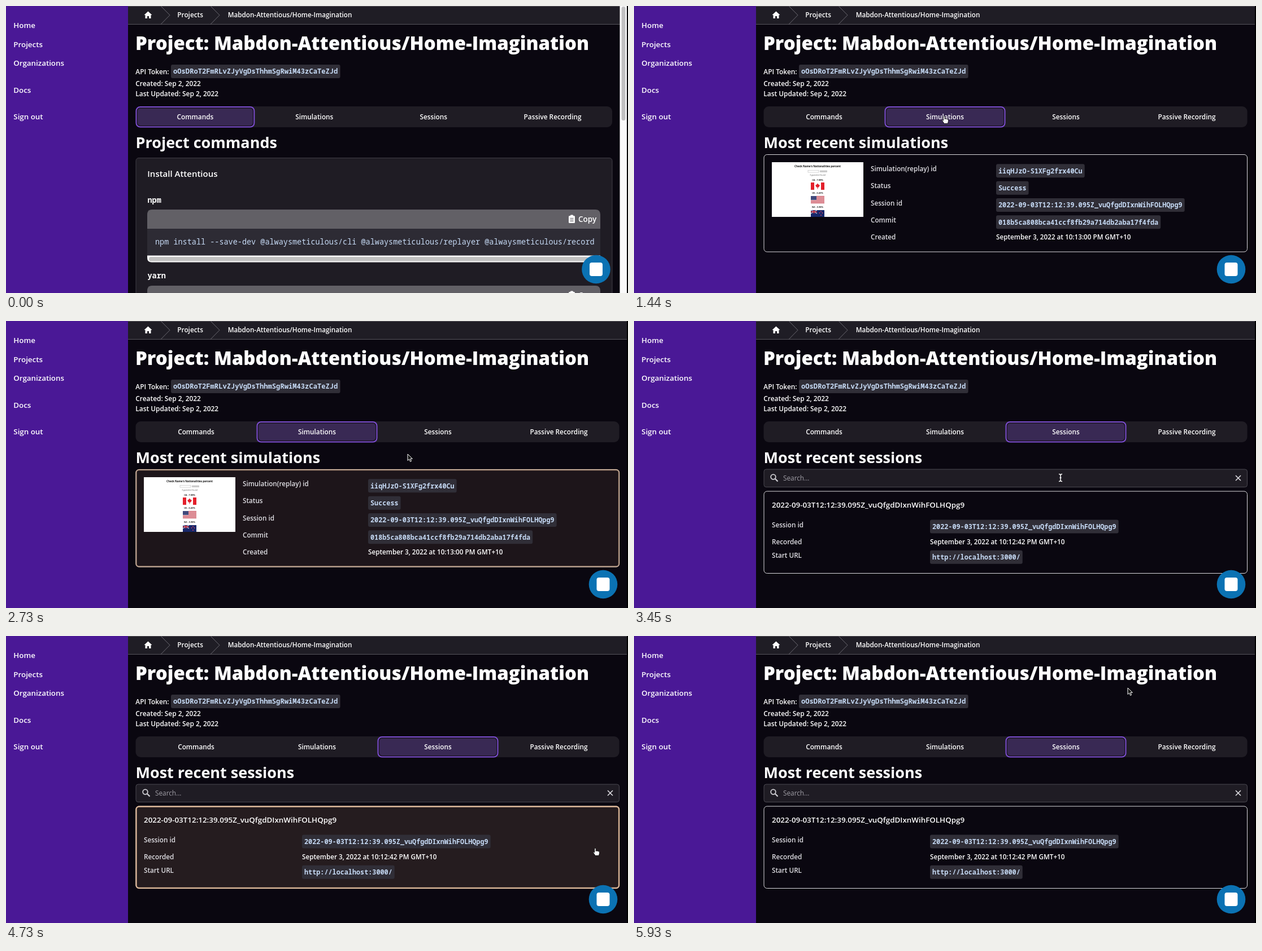
An HTML page for the animation above (6090 ms loop, 1101 by 509 pixels).

```html
<!DOCTYPE html>
<html lang="en">
<head>
<meta charset="utf-8">
<title>Project dashboard</title>
<style>
  html, body { margin: 0; width: 100%; height: 100%; overflow: hidden; background: #0a0710; }
  svg { display: block; width: 1101px; height: 509px; font-family: "Open Sans", sans-serif; }
  text { white-space: pre; }
  .mono { font-family: "Noto Sans Mono", monospace; }
</style>
</head>
<body>
<svg id="stage" viewBox="0 0 1101 509"></svg>
<script>
const LOOP = 6090, PANEL = '#1f1c24', EDGE = '#3f3d45';
const OWNER = 'Mabdon-Attentious/Home-Imagination';
const SESSION = '2022-09-03T12:12:39.095Z_vuQfgdDIxnWihFOLHQpg9';

const rect = (x, y, w, h, fill, r = 0, more = '') =>
  `<rect x="${x}" y="${y}" width="${w}" height="${h}" rx="${r}" fill="${fill}" ${more}/>`;
const path = (d, more) => `<path d="${d}" ${more}/>`;
const line = (d, color, w = 1) => path(d, `fill="none" stroke="${color}" stroke-width="${w}"`);
const text = (s, x, y, size = 11.8, weight = 600, fill = '#fff', more = '') =>
  `<text x="${x}" y="${y}" font-size="${size}" font-weight="${weight}" fill="${fill}" ${more}>${s}</text>`;
const mid = (s, x, y, size, weight, fill) => text(s, x, y, size, weight, fill, 'text-anchor="middle"');
const mono = (s, x, y, size, weight, fill) => text(s, x, y, size, weight, fill, 'class="mono"');
const code = (s, x, cy, size = 11.8) =>
  rect(x, cy - 12, s.length * size * .6 + 8, 24, '#302e37', 3) + mono(s, x + 4, cy + 4.2, size, 600, '#c6daf5');
const label = (s, x, y) => text(s, x, y, 11.7, 600, '#e0dfe4');
const heading = s => text(s, 229.5, 252, 27, 700);

function tabs(width, active) {
  const w = width / 4;
  let out = rect(229.5, 178, width, 37, PANEL, 9);
  ['Commands', 'Simulations', 'Sessions', 'Passive Recording'].forEach((name, i) => {
    const x = 229.5 + i * w;
    if (i === active)
      out += rect(x + 1, 179, w - 2, 35.5, '#1a1422', 7, 'stroke="#7c4dd0" stroke-width="2"') +
             rect(x + 3.5, 181.5, w - 7, 30.5, '#392954', 5);
    out += mid(name, x + w / 2, 200.8, 11.8, 600);
  });
  return out;
}

const chat = x => `<circle cx="${x}" cy="467" r="25.3" fill="#0b72b3"/>` + rect(x - 11.5, 455, 23, 24, '#fff', 4);

const card = (y, h) =>
  rect(230, y + .5, 855.5, h, '#0a0710', 5.5, 'stroke="#d9d8dc"') +
  rect(230.5, y + 1, 854.5, h - 1, '#2c2123', 5, 'class="hover" stroke="#f6caa3" stroke-width="2.4" opacity="0"');

const copyBar = y =>
  path(`M250 ${y + 34}v-25q0-9 9-9h784q9 0 9 9v25z`, 'fill="#626066"') +
  rect(996, y + 11, 11, 13, '#fff', 1.5) + rect(999, y + 9.5, 5, 3.5, '#fff', 1) +
  line(`M998.500 ${y + 15.5}h6m-6 2.500h6m-6 2.500h6`, '#626066') +
  text('Copy', 1013, y + 22, 13.5);

function commands() {
  return tabs(843.5, 0) + heading('Project commands') +
    rect(230, 269.5, 843, 260, PANEL, 5, `stroke="${EDGE}"`) +
    text('Install Attentious', 250.3, 303, 15, 600) +
    mono('npm', 250.5, 348.5, 13.5, 700) +
    copyBar(361) + rect(250, 395, 802, 48, '#2d2b34') +
    mono('npm install --save-dev @alwaysmeticulous/cli @alwaysmeticulous/replayer @alwaysmeticulous/record',
      264, 423, 13.5, 500, '#c6daf5') +
    path('M250 442.500h802v4q0 8-8 8h-786q-8 0-8-8z', 'fill="#fafafa"') +
    rect(253, 445, 778, 7.5, '#c1c1c1', 3.7) +
    mono('yarn', 250.5, 483, 13.5, 700) + copyBar(496) +
    rect(1086.5, 0, 12.5, 509, '#fafafa') + rect(1089.5, 1, 7, 202, '#c1c1c1', 3.5) + chat(1044.5);
}

function flags() {
  const canada = rect(313, 313, 24, 13, '#e3202b') + rect(319, 313, 12, 13, '#fff') +
    path('M325 314.500l1.500 2 2.500 1.500-2 3.500h-1.500v3h-1v-3h-1.500l-2-3.500 2.500-1.500z', 'fill="#e3202b"');
  let states = rect(313, 337, 24, 13, '#f5dfe0');
  for (let i = 0; i < 7; i++) states += rect(313, 337 + i * 2, 24, 1, '#c43b4b');
  states += rect(313, 337, 10, 7, '#414a7c');
  const zealand = rect(313, 362, 24, 12, '#17286b') +
    line('M313 362l11 6m0-6l-11 6', '#fff') + line('M313 365h11m-5.500-3v6', '#d02a3a', 1.5) +
    [[331, 364.5], [328.5, 367], [333.5, 367], [331, 371]]
      .map(([x, y]) => `<circle cx="${x}" cy="${y}" r=".9" fill="#d5415a"/>`).join('');
  return canada + states + zealand;
}

function simulations() {
  const small = (s, y) => mid(s, 325, y, 3.9, 700, '#222');
  const names = ['Simulation(replay) id', 'Status', 'Session id', 'Commit', 'Created'];
  const values = ['iiqHJzO-S1XFg2frx40Cu', 'Success', SESSION, '018b5ca808bca41ccf8fb29a714db2aba17f4fda'];
  return tabs(856, 1) + heading('Most recent simulations') + card(263, 172.5) +
    rect(244, 277, 162, 97, '#fff') +
    mid("Check Name's Nationalities percent", 325, 285.7, 4.6, 700, '#111') +
    rect(308, 291.5, 19, 3.5, '#fff', 0, 'stroke="#aaa" stroke-width=".5"') +
    rect(329, 291.5, 13, 3.5, '#ccc') +
    mid('3 guess(es) found', 325, 301, 3.4, 400, '#555') +
    small('CA - 7.88%', 309.5) + small('US - 6.43%', 333.3) + small('NZ - 5.98%', 357.8) + flags() +
    names.map((s, i) => label(s, 419, 292.8 + i * 30.35)).join('') +
    values.map((s, i) => code(s, 641, 292.3 + i * 30.35)).join('') +
    text('September 3, 2022 at 10:13:00 PM GMT+10', 641, 414.2, 11.7) + chat(1057);
}

function sessions() {
  return tabs(856, 2) + heading('Most recent sessions') +
    rect(230, 263, 855.5, 31.5, PANEL, 4, 'stroke="#4a4850"') +
    `<circle cx="246.500" cy="276.500" r="4.300" fill="none" stroke="#d0cfd4" stroke-width="1.800"/>` +
    line('M249.800 279.800l4.700 4.700', '#d0cfd4', 2.2) +
    text('Search...', 264, 283, 11.8, 500, '#a09ea6') +
    line('M1065 274l9 9m0-9l-9 9', '#e4e3e8', 1.5) +
    card(301.5, 145.5) + text(SESSION, 244, 330.7, 13.4) +
    label('Session id', 244, 365.5) + label('Recorded', 244, 396) + label('Start URL', 244, 419.5) +
    code(SESSION, 524, 364.5) +
    text('September 3, 2022 at 10:12:42 PM GMT+10', 524, 396, 11.7) +
    code('http://localhost:3000/', 524, 418.7) + chat(1057);
}

function frame() {
  const nav = [['Home', 38.8], ['Projects', 72.6], ['Organizations', 106.3], ['Docs', 153.6], ['Sign out', 200.8]];
  return rect(0, 0, 1101, 509, '#0a0710') + rect(0, 0, 216, 509, '#4a1896') +
    nav.map(([s, y]) => text(s, 13.3, y, 13.35)).join('') +
    rect(216, 0, 883, 32.5, '#1f1d25') + line('M216 .500h883M216 32.500h883', '#56545b') +
    line('M274 0l16 16.200-16 16.300M362 0l16 16.200-16 16.300', '#6a6870') +
    path('M251.500 9.500l7 6.500h-2v6h-3.500v-4h-3v4h-3.500v-6h-2z', 'fill="#fff"') +
    text('Projects', 303.3, 20.3) + text(OWNER, 392.7, 20.3, 11.7) +
    text('Project: ' + OWNER, 229, 78, 33, 800) +
    text('API Token:', 229.3, 120.6, 11.9) + code('oOsDRoT2FmRLvZJyVgDsThhmSgRwiM43zCaTeZJd', 292, 116, 12.15) +
    text('Created: Sep 2, 2022', 229.3, 142, 11.9) + text('Last Updated: Sep 2, 2022', 229.3, 160.4, 11.9);
}

const cursors = {
  arrow: path('M0 0v11.500l2.700-2.500 1.900 4.400 2-.9-1.900-4.200h3.700z', 'fill="#111" stroke="#fff"'),
  hand: path('M-1.200 1q1.200-2 2.400 0v4.500q1.200-1.200 2.200 0 1.200-.8 2 .4 1.800-.6 2 1.200v2.900l-1.200 3.500h-6l-3.800-5.500q.4-1.800 2.400 0z',
    'fill="#fff" stroke="#111" stroke-width=".9"'),
  beam: line('M-3-6.500q3 0 3 2v9q0 2-3 2M3-6.500q-3 0-3 2v9q0 2 3 2M-1.500 0h3', '#fff', 1.5)
};

// Pointer path: time, x, y
const route = [
  [320, 679, 383], [880, 552, 225], [960, 551, 211], [1120, 549, 195], [1770, 549, 195], [1930, 552, 238],
  [2330, 600, 335], [2490, 640, 320], [2650, 692, 270], [2730, 711, 236], [2970, 773, 198], [3050, 776, 195],
  [3290, 776, 195], [3370, 772, 230], [3450, 755, 278], [3530, 720, 310], [3850, 541, 346], [3930, 525, 350],
  [4010, 530, 351], [4330, 800, 400], [4570, 1086, 464], [4650, 1073, 425], [4730, 1043, 376],
  [5210, 835, 105], [5290, 839, 101], [5610, 882, 74], [5770, 880, 78], [5930, 874, 92]
];

function pointer(t) {
  const i = route.findIndex(p => p[0] > t);
  if (i < 0) return route.at(-1).slice(1);
  if (i === 0) return route[0].slice(1);
  const [a, b] = [route[i - 1], route[i]], k = (t - a[0]) / (b[0] - a[0]);
  return [a[1] + (b[1] - a[1]) * k, a[2] + (b[2] - a[2]) * k];
}

const pageAt = t => t < 1200 ? 0 : t < 3210 ? 1 : 2;

function overCard(t) {
  const [x, y] = pointer(t), [top, bottom] = [[999, 999], [263, 436], [302, 448]][pageAt(t)];
  return x > 230 && x < 1086 && y > top && y < bottom;
}

// Share of the last 160 ms spent over the card, which gives the fade
function hoverAt(t) {
  let n = 0;
  for (let k = 0; k < 16; k++) n += overCard(t - k * 10);
  return n / 16;
}

function cursorAt(t) {
  const [x, y] = pointer(t);
  if ((y > 178 && y < 215) || overCard(t) || Math.hypot(x - 1057, y - 467) < 32) return 'hand';
  if ((pageAt(t) === 2 && y > 263 && y < 295) || (y > 50 && y < 86)) return 'beam';
  return 'arrow';
}

const stage = document.getElementById('stage');
stage.innerHTML = frame() + [commands, simulations, sessions].map(f => `<g class="page">${f()}</g>`).join('') +
  rect(1099, 0, 2, 509, '#000') + '<g id="cursor"></g>';
const pages = stage.querySelectorAll('.page');
const hovers = stage.querySelectorAll('.hover');
const cursor = document.getElementById('cursor');
let shape = '';

function draw(now) {
  const raw = now % LOOP, start = raw < 1770 ? 0 : 10;
  const t = start + Math.floor((raw - start) / 80) * 80;
  const page = pageAt(t), kind = cursorAt(t), hover = hoverAt(t);
  pages.forEach((g, i) => g.setAttribute('display', i === page ? 'inline' : 'none'));
  hovers.forEach(r => r.setAttribute('opacity', hover));
  if (kind !== shape) cursor.innerHTML = cursors[shape = kind];
  cursor.setAttribute('display', t < 320 ? 'none' : 'inline');
  cursor.setAttribute('transform', `translate(${pointer(t)})`);
}

const begin = performance.now();
function tick() {
  draw(performance.now() - begin);
  requestAnimationFrame(tick);
}
tick();
</script>
</body>
</html>
```
